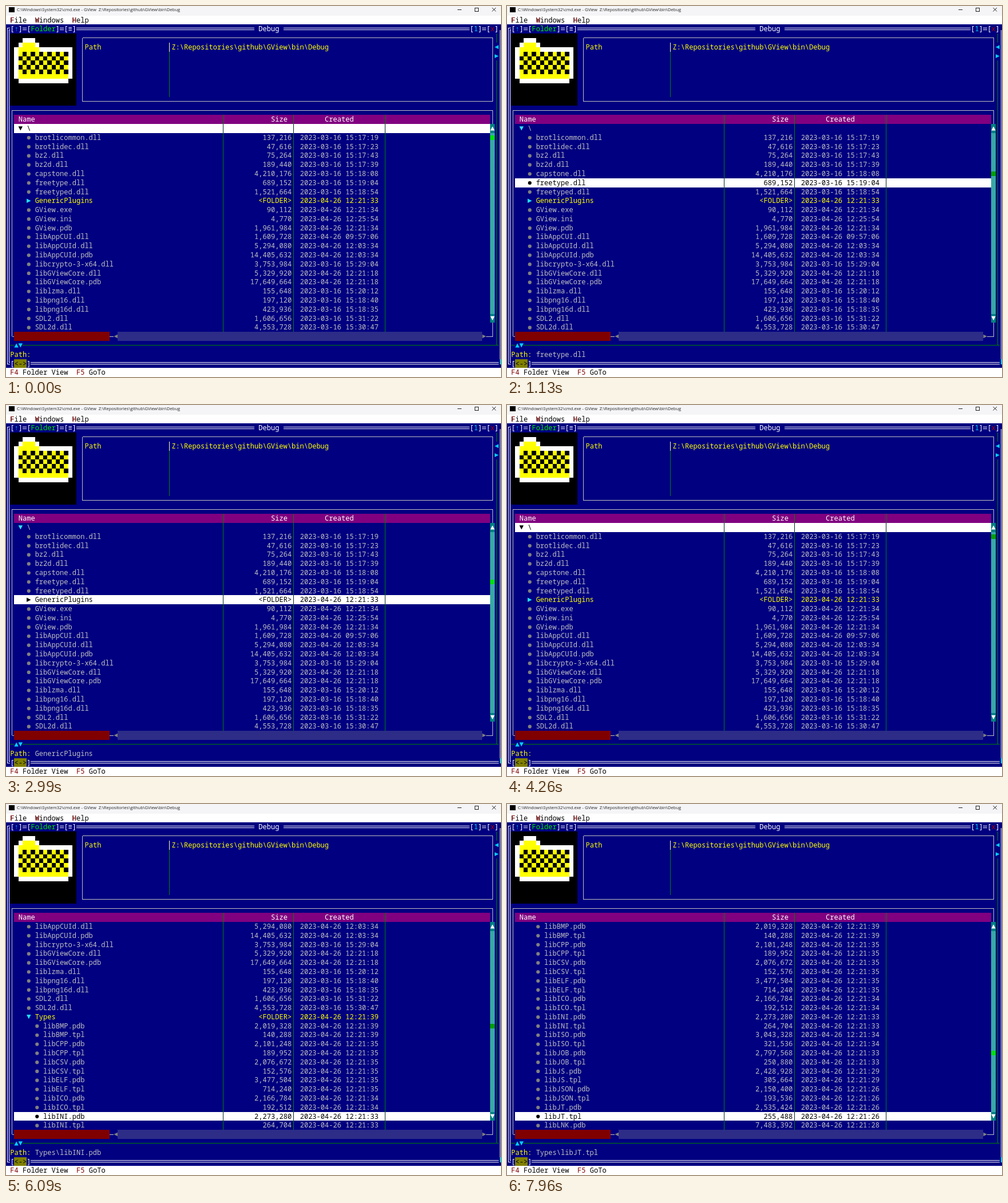
Animation, 865 px wide and 648 px high, one loop 8 s. Source, as an HTML page with a canvas:

```html
<!DOCTYPE html>
<html lang="en">
<head>
<meta charset="utf-8">
<title>Folder view</title>
<style>
html, body { margin: 0; width: 100%; height: 100%; overflow: hidden; background: #000080; }
canvas { display: block; width: 865px; height: 648px; }
</style>
</head>
<body>
<canvas id="stage" width="865" height="648"></canvas>
<script>
const ctx = document.getElementById('stage').getContext('2d');
const LOOP = 8000, CW = 7.235, RH = 15.79, TOP = 16.5;
const LIST_ROW = 12, VISIBLE = 23;
const NAVY = '#000080', SILVER = '#c0c0c0', GRAY = '#808080', WHITE = '#fff', BLACK = '#000';
const YELLOW = '#ff0', CYAN = '#00d0ff', GREEN = '#008000', RED = '#800000', TEAL = '#008080';

// Each line: indent, name, size, month-day, time. "D" marks a folder.
const entries = `
\\
 brotlicommon.dll 137,216 03-16 15:17:19
 brotlidec.dll 47,616 03-16 15:17:23
 bz2.dll 75,264 03-16 15:17:43
 bz2d.dll 189,440 03-16 15:17:39
 capstone.dll 4,210,176 03-16 15:18:08
 freetype.dll 689,152 03-16 15:19:04
 freetyped.dll 1,521,664 03-16 15:18:54
 GenericPlugins D 04-26 12:21:33
  libCharacterTable.gpl 65,536 04-26 12:21:34
  libCharacterTable.pdb 1,822,720 04-26 12:21:34
  libDropperStrings.gpl 361,472 04-26 12:21:35
  libDropperStrings.pdb 4,141,056 04-26 12:21:35
  libHashes.gpl 161,280 04-26 12:21:34
  libHashes.pdb 2,461,696 04-26 12:21:34
  libSyncCompare.gpl 172,544 04-26 12:21:24
  libSyncCompare.pdb 2,617,344 04-26 12:21:24
 GView.exe 90,112 04-26 12:21:34
 GView.ini 4,770 04-26 12:25:54
 GView.pdb 1,961,984 04-26 12:21:34
 libAppCUI.dll 1,609,728 04-26 09:57:06
 libAppCUId.dll 5,294,080 04-26 12:03:34
 libAppCUId.pdb 14,405,632 04-26 12:03:34
 libcrypto-3-x64.dll 3,753,984 03-16 15:29:04
 libGViewCore.dll 5,329,920 04-26 12:21:18
 libGViewCore.pdb 17,649,664 04-26 12:21:18
 liblzma.dll 155,648 03-16 15:20:12
 libpng16.dll 197,120 03-16 15:18:40
 libpng16d.dll 423,936 03-16 15:18:35
 SDL2.dll 1,606,656 03-16 15:31:22
 SDL2d.dll 4,553,728 03-16 15:30:47
 Types D 04-26 12:21:39
  libBMP.pdb 2,019,328 04-26 12:21:39
  libBMP.tpl 140,288 04-26 12:21:39
  libCPP.pdb 2,101,248 04-26 12:21:35
  libCPP.tpl 189,952 04-26 12:21:35
  libCSV.pdb 2,076,672 04-26 12:21:35
  libCSV.tpl 152,576 04-26 12:21:35
  libELF.pdb 3,477,504 04-26 12:21:35
  libELF.tpl 714,240 04-26 12:21:35
  libICO.pdb 2,166,784 04-26 12:21:34
  libICO.tpl 192,512 04-26 12:21:34
  libINI.pdb 2,273,280 04-26 12:21:33
  libINI.tpl 264,704 04-26 12:21:33
  libISO.pdb 3,043,328 04-26 12:21:34
  libISO.tpl 321,536 04-26 12:21:34
  libJOB.pdb 2,797,568 04-26 12:21:33
  libJOB.tpl 250,880 04-26 12:21:33
  libJS.pdb 2,428,928 04-26 12:21:29
  libJS.tpl 305,664 04-26 12:21:29
  libJSON.pdb 2,150,400 04-26 12:21:26
  libJSON.tpl 193,536 04-26 12:21:26
  libJT.pdb 2,535,424 04-26 12:21:26
  libJT.tpl 255,488 04-26 12:21:26
  libLNK.pdb 7,483,392 04-26 12:21:28
  libLNK.tpl 1,287,680 04-26 12:21:28
  liblzma.dll 436,224 00-11 22:40:37
  libMACHO.pdb 8,294,400 04-26 12:21:32
  libMACHO.tpl 2,601,472 04-26 12:21:32
  libMAM.pdb 2,101,248 04-26 12:21:25
  libMAM.tpl 150,528 04-26 12:21:25
  libPCAP.pdb 6,844,416 04-26 12:21:28
  libPCAP.tpl 1,408,512 04-26 12:21:28
  libPE.pdb 5,509,120 04-26 12:21:27
  libPE.tpl 1,221,120 04-26 12:21:27
  libPREFETCH.pdb 3,166,208 04-26 12:21:26
  libPREFETCH.tpl 489,472 04-26 12:21:26`;

let parent = '';
const allItems = entries.slice(1).split('\n').map(line => {
  const depth = line.search(/\S/);
  const [name, size, day, time] = line.trim().split(' ');
  const folder = size === 'D';
  if (folder) parent = name;
  return {
    name, depth, folder,
    size: folder ? '<FOLDER>' : size || '',
    date: day ? `2023-${day} ${time}` : '',
    path: depth === 0 ? '' : depth === 2 ? `${parent}\\${name}` : name
  };
});
const collapsedItems = allItems.filter(item => item.depth < 2);

// time, selected item, first visible item, scroll thumb row
const moves = [
  [0, 0, 0, 0], [80, 1, 0, 1], [460, 2, 0, 1], [590, 3, 0, 2], [730, 4, 0, 2],
  [990, 5, 0, 3], [1130, 6, 0, 4], [1260, 7, 0, 4], [1390, 8, 0, 5],
  [2260, 9, 0, 5], [2790, 8, 0, 5], [3730, 7, 0, 4], [3990, 6, 0, 4], [4260, 0, 0, 0],
  [5820, 31, 10, 0], [6090, 42, 21, 10], [6220, 49, 28, 12], [6550, 65, 44, 11],
  [6900, 45, 44, 11], [7150, 32, 31, 8], [7280, 50, 31, 12], [7690, 52, 31, 13], [7960, 53, 32, 13]
];

const colX = col => col * CW;
const rowY = row => TOP + row * RH;
const midX = col => (col + 0.5) * CW;
const midY = row => TOP + (row + 0.5) * RH;
const within = (t, from, to) => t >= from && t < to;

function box(color, x0, y0, x1, y1) {
  const x = Math.round(x0), y = Math.round(y0);
  ctx.fillStyle = color;
  ctx.fillRect(x, y, Math.round(x1) - x, Math.round(y1) - y);
}
const cells = (color, col, row, cols, rows = 1) =>
  box(color, colX(col), rowY(row), colX(col + cols), rowY(row + rows));

function hline(color, x0, x1, y, weight = 1) {
  box(color, x0, Math.floor(y), x1, Math.floor(y) + weight);
}
function vline(color, x, y0, y1, weight = 1) {
  box(color, Math.floor(x), y0, Math.floor(x) + weight, y1);
}
function text(str, col, row, color) {
  ctx.font = '12.06px "Noto Sans Mono", "DejaVu Sans Mono", monospace';
  ctx.fillStyle = color;
  ctx.fillText(str, colX(col), rowY(row) + 12);
}
function poly(color, points) {
  ctx.fillStyle = color;
  ctx.beginPath();
  for (const [x, y] of points) ctx.lineTo(x, y);
  ctx.fill();
}
function triangle(dir, col, row, color, r = 3.7) {
  const x = midX(col), y = midY(row);
  if (dir === 'up' || dir === 'down') {
    const s = dir === 'up' ? -1 : 1;
    poly(color, [[x - r, y - s * r], [x + r, y - s * r], [x, y + s * r]]);
  } else {
    const s = dir === 'left' ? -1 : 1;
    poly(color, [[x - s * r, y - r], [x - s * r, y + r], [x + s * r, y]]);
  }
}
function dot(col, row, color) {
  ctx.fillStyle = color;
  ctx.beginPath();
  ctx.arc(midX(col), midY(row) + 0.4, 3.1, 0, 7);
  ctx.fill();
}
function hatch(color, col, row, cols, rows) {
  const tile = document.createElement('canvas');
  tile.width = tile.height = 2;
  const t = tile.getContext('2d');
  t.fillStyle = color;
  t.fillRect(0, 0, 1, 1);
  t.fillRect(1, 1, 1, 1);
  cells(ctx.createPattern(tile, 'repeat'), col, row, cols, rows);
}

function titleBar() {
  box('#f5f5f7', 0, 0, 865, TOP);
  box(BLACK, 5, 2, 15, 11);
  ctx.font = '7.55px "Open Sans", "Noto Sans", sans-serif';
  ctx.fillStyle = '#222';
  ctx.fillText('C:\\Windows\\System32\\cmd.exe - GView \u00a0Z:\\Repositories\\github\\GView\\bin\\Debug', 19, 9);
  hline('#222', 789, 796, 6);
  ctx.strokeStyle = '#222';
  ctx.lineWidth = 1;
  ctx.strokeRect(819.5, 3.5, 6, 6);
  ctx.beginPath();
  ctx.moveTo(849.5, 3); ctx.lineTo(856, 9.5);
  ctx.moveTo(856, 3); ctx.lineTo(849.5, 9.5);
  ctx.stroke();
}

function menuBar() {
  cells(WHITE, 0, 0, 120);
  [['File', 1], ['Windows', 7], ['Help', 16]].forEach(([label, col]) => {
    text(label, col, 0, BLACK);
    text(label[0], col, 0, RED);
  });
}

function doubleLine(fromCol, toCol, row) {
  const y = midY(row);
  hline(WHITE, colX(fromCol), colX(toCol), y - 1.5);
  hline(WHITE, colX(fromCol), colX(toCol), y + 1.5);
}

function windowFrame() {
  cells(NAVY, 0, 1, 120, 38);
  const top = midY(1), bottom = midY(38);
  for (const d of [-1.5, 1.5]) {
    vline(WHITE, midX(0) + d, top + d, bottom - d);
    vline(WHITE, midX(119) + d, top - d, bottom + d);
    hline(WHITE, midX(0) + d, colX(1), top + d);
    hline(WHITE, midX(0) + d, colX(1), bottom - d);
  }
  [[4, 5], [13, 14], [17, 60], [67, 112], [115, 116]].forEach(([a, b]) => doubleLine(a, b, 1));
  text('[', 1, 1, WHITE); text('↑', 2, 1, CYAN); text(']', 3, 1, WHITE);
  text('[', 5, 1, WHITE); text('Folder', 6, 1, '#0e0'); text(']', 12, 1, WHITE);
  text('[≡]', 14, 1, WHITE);
  text('Debug', 61, 1, WHITE);
  text('[', 112, 1, WHITE); text('1', 113, 1, CYAN); text(']', 114, 1, WHITE);
  text('[', 116, 1, WHITE); text('x', 117, 1, '#b00000'); text(']', 118, 1, WHITE);
  doubleLine(6, 119, 38);
  cells('#808000', 2, 38, 3);
  text('[', 1, 38, WHITE); text('<->', 2, 38, BLACK); text(']', 5, 38, WHITE);
  vline(CYAN, 863, 617, 626, 2);
}

function folderIcon() {
  cells(BLACK, 1, 2, 16, 8);
  const px = (color, x, y, w, h = 1) =>
    box(color, colX(1 + x), rowY(2 + y / 2), colX(1 + x + w), rowY(2 + (y + h) / 2));
  px(WHITE, 3, 1, 3);
  px(WHITE, 2, 2, 5);
  px(YELLOW, 3, 2, 3);
  px(WHITE, 1, 3, 14, 7);
  px(WHITE, 2, 10, 12);
  px(YELLOW, 2, 3, 5);
  px(YELLOW, 2, 4, 12, 6);
  for (let y = 4; y < 9; y++)
    for (let x = 2; x < 14; x++)
      if ((x + y) % 2) px(BLACK, x, y, 1);
}

function pathPanel() {
  const left = midX(18), right = midX(117), top = midY(2), bottom = midY(9);
  hline(SILVER, left, right + 1, top);
  hline(SILVER, left, right + 1, bottom);
  vline(SILVER, left, top, bottom);
  vline(SILVER, right, top, bottom);
  vline(GREEN, midX(39), rowY(3), rowY(9));
  vline('#ffffa0', midX(39), rowY(3), rowY(4));
  text('Path', 19, 3, YELLOW);
  text('Z:\\Repositories\\github\\GView\\bin\\Debug', 40, 3, YELLOW);
}

function splitters() {
  vline(GREEN, midX(118), rowY(2), midY(36));
  cells(NAVY, 118, 3, 1, 2);
  triangle('left', 118, 3, CYAN, 3.4);
  triangle('right', 118, 4, CYAN, 3.4);
  hline(GREEN, colX(1), colX(119), midY(36));
  cells(NAVY, 2, 36, 2);
  triangle('up', 2, 36, CYAN);
  triangle('down', 3, 36, CYAN);
}

function columnLines(row, color) {
  for (const col of [52, 69, 91]) vline(color, midX(col), rowY(row), rowY(row + 1));
}

function listFrame() {
  const left = midX(1), right = midX(117), top = midY(10), bottom = midY(35);
  hline(SILVER, left, right + 1, top);
  vline(SILVER, left, top, bottom);
  vline(SILVER, right, top, bottom);
  hline(SILVER, left, colX(26), bottom);
  hline(SILVER, colX(116), right + 1, bottom);
  cells('#800080', 2, 11, 115);
  columnLines(11, GREEN);
  text('Name', 3, 11, WHITE);
  text('Size', 64, 11, WHITE);
  text('Created', 77, 11, WHITE);
  cells(RED, 2, 35, 23);
  triangle('left', 26, 35, GRAY, 3.2);
  hatch('#5a5a90', 27, 35, 88, 1);
  triangle('right', 115, 35, GRAY, 3.2);
}

function listRow(item, row, selected, open) {
  if (selected) cells(WHITE, 2, row, 115);
  columnLines(row, selected ? '#002020' : GREEN);
  const pick = color => selected ? BLACK : color;
  const color = pick(item.folder ? YELLOW : SILVER);
  const markCol = 3 + 2 * item.depth;
  if (item.depth === 0) triangle('down', markCol, row, pick('#30e0ff'));
  else if (item.folder) triangle(open ? 'down' : 'right', markCol, row, pick('#20e0ff'));
  else dot(markCol, row, pick(GRAY));
  text(item.name, markCol + 2, row, color);
  text(item.size, 69 - item.size.length, row, color);
  text(item.date, 71, row, color);
}

function scrollBar(thumb, bright) {
  cells(TEAL, 117, LIST_ROW, 1, 22);
  hatch('#70d0c8', 117, LIST_ROW + 1, 1, 20);
  triangle('up', 117, LIST_ROW, WHITE);
  triangle('down', 117, LIST_ROW + 21, WHITE);
  const y = midY(LIST_ROW + 1 + thumb);
  box(bright ? '#00e010' : '#00a000', colX(117), y - 4, colX(118), y + 4);
}

function statusBar(ctrlHeld) {
  cells(WHITE, 0, 39, 120, 2);
  if (ctrlHeld) return text('Ctrl+', 0, 39, GRAY);
  text('F4', 1, 39, RED);
  text('Folder View', 4, 39, BLACK);
  text('F5', 17, 39, RED);
  text('GoTo', 20, 39, BLACK);
}

function draw(t) {
  const [, selected, first, thumb] = moves.filter(m => m[0] <= t).pop();
  const expanded = t >= 4850;
  const items = expanded ? allItems : collapsedItems;
  const dimThumb = within(t, 80, 1660) || within(t, 3730, 4850) || within(t, 6090, 7690);
  const path = within(t, 5490, 5820) ? 'Types' : items[selected].path;

  titleBar();
  menuBar();
  windowFrame();
  folderIcon();
  pathPanel();
  splitters();
  listFrame();
  items.slice(first, first + VISIBLE).forEach((item, i) =>
    listRow(item, LIST_ROW + i, first + i === selected, expanded));
  scrollBar(thumb, !dimThumb);
  text('Path:', 1, 37, YELLOW);
  text(path, 7, 37, SILVER);
  statusBar(within(t, 4690, 5820));
}

function tick() {
  draw(performance.now() % LOOP);
  requestAnimationFrame(tick);
}
tick();
</script>
</body>
</html>
```
